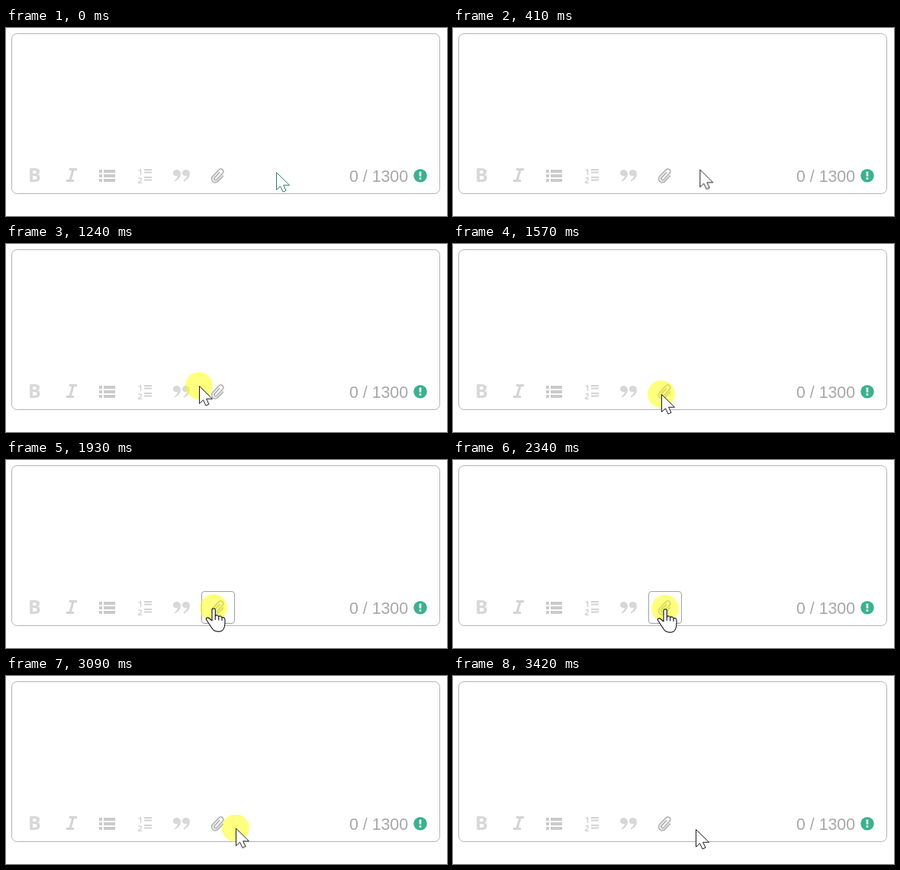
An HTML page that plays this animation: 578 by 248 pixels, repeating every 3.77 s.

```html
<!DOCTYPE html>
<html lang="en">
<head>
<meta charset="utf-8">
<title>Editor toolbar</title>
<style>
  html, body { margin: 0; width: 100%; height: 100%; overflow: hidden; background: #fff; }
  svg { display: block; }
  .bold { font: bold 25px "Open Sans", sans-serif; }
  .digit { font: bold 10.5px "Open Sans", sans-serif; }
  .count { font: 21.33px "Liberation Sans", Arial, sans-serif; }

  #pointer, #arrow, #spot, .hover { animation: 3770ms step-end infinite; }
  #pointer { animation-name: move; }
  #arrow { animation-name: arrow; }
  #spot { animation-name: spot; }
  .hover { animation-name: hover; }

  /* Each stretch of movement advances in poses about 70 ms apart. */
  @keyframes move {
    0%     { transform: translate(354px, 190px); animation-timing-function: steps(7); }
    12.72% { transform: translate(311px, 185px); }
    21.48% { transform: translate(303px, 176px); animation-timing-function: steps(3); }
    27.18% { transform: translate(268px, 167px); animation-timing-function: steps(3); }
    32.88% { transform: translate(253px, 187px); }
    34.2%  { transform: translate(259px, 198px); animation-timing-function: steps(3); }
    39.88% { transform: translate(273px, 198px); animation-timing-function: steps(5); }
    49.32% { transform: translate(269px, 187px); }
    51.18% { transform: translate(272px, 195px); animation-timing-function: steps(5); }
    62.05% { transform: translate(278px, 196px); animation-timing-function: steps(2); }
    65.77% { transform: translate(281px, 191px); animation-timing-function: steps(3); }
    71.34% { transform: translate(275px, 199px); }
    80.1%  { transform: translate(284px, 199px); animation-timing-function: steps(2); }
    83.8%, to { transform: translate(318px, 202px); }
  }
  @keyframes spot {
    0%, 90.7%, to { visibility: hidden; }
    16.17% { visibility: visible; }
  }
  @keyframes hover {
    0%, 81.94%, to { visibility: hidden; }
    51.18% { visibility: visible; }
  }
  @keyframes arrow {
    0% { visibility: visible; stroke: #2b7d68; }
    1.81%, 81.94%, to { visibility: visible; stroke: #1c1c1c; }
    51.18% { visibility: hidden; stroke: #1c1c1c; }
  }
</style>
</head>
<body>
<svg width="578" height="248" viewBox="0 0 578 248">
  <rect x="7.5" y="7.5" width="561" height="211" rx="7" fill="#fff" stroke="#b2b2b2"/>

  <text class="bold" x="29" y="203" fill="#d8d8d8">B</text>
  <path d="M83 186.5h10M79 201.5h10M88 187l-4 14" fill="none" stroke="#d4d4d4" stroke-width="3.2"/>
  <path d="M122 187h4v4h-4zm6 0h15v4h-15zM122 193h4v4h-4zm6 0h15v4h-15zM122 199h4v4h-4zm6 0h15v4h-15z" fill="#cacaca"/>
  <g fill="#d2d2d2">
    <text class="digit" x="173" y="194">1</text>
    <text class="digit" x="172.5" y="204.5">2</text>
    <path d="M181 186h10v2h-10zm0 3.5h10v2h-10zM181 196h10v2h-10zm0 3.5h10v2h-10z"/>
  </g>
  <g fill="#d8d8d8">
    <path id="quote" d="M223.500 187c-2.800 0-4.500 1.800-4.500 4.200s1.800 4.100 4.200 4.100q1.300 0 2-.5c-.3 2.700-2 4.800-4.600 6.200l.8 1.500c4.800-2.200 7.600-6 7.600-10.500 0-3-2.300-5-5.500-5z"/>
    <use href="#quote" x="12"/>
  </g>

  <rect class="hover" x="256.5" y="173.5" width="43" height="42" rx="3.5" fill="#fff" stroke="#a0a0a0"/>
  <path transform="translate(278 195) rotate(43)" fill="none" stroke="#b8b8b8" stroke-width="1.9"
    d="M4.700-5V5.500a4.700 4.700 0 0 1-9.400 0V-6.500a3.400 3.400 0 0 1 6.800 0V5a1.900 1.900 0 0 1-3.800 0V-5"/>

  <text class="count" x="450" y="203" fill="#a8a8a8">0 / 1300</text>
  <circle cx="543" cy="194.7" r="8.8" fill="#3cb08f"/>
  <path d="M541.700 189.500h2.600v6.300h-2.600zm0 7.800h2.600v2.400h-2.600z" fill="#fff"/>

  <g id="pointer">
    <circle id="spot" r="18" fill="#ff0" fill-opacity=".5"/>
    <path id="arrow" d="M.5.5V23.500L5.500 18.800 9 26.200 13 24.400 9.600 17.300H17.500Z" fill="#fff"/>
    <g class="hover" stroke="#111" stroke-width="1.1" stroke-linejoin="round">
      <path fill="#fff" d="M-2 17V3C-2 0 2.300 0 2.300 3V10.500C3.500 9.500 6.500 9.800 6.700 11.500 8 10.300 10.700 11 11 13 12.500 12 15 13 15 15.500V19C15 24 13.500 30.800 8 31.300 3 31.700 0 30.500-2 27L-9.500 15.500C-10.500 13-7.500 12-5.500 14Z"/>
      <path fill="none" d="M2.300 10.500V16M6.700 11.500V16.500M11 13V17"/>
    </g>
  </g>
</svg>
</body>
</html>
```
